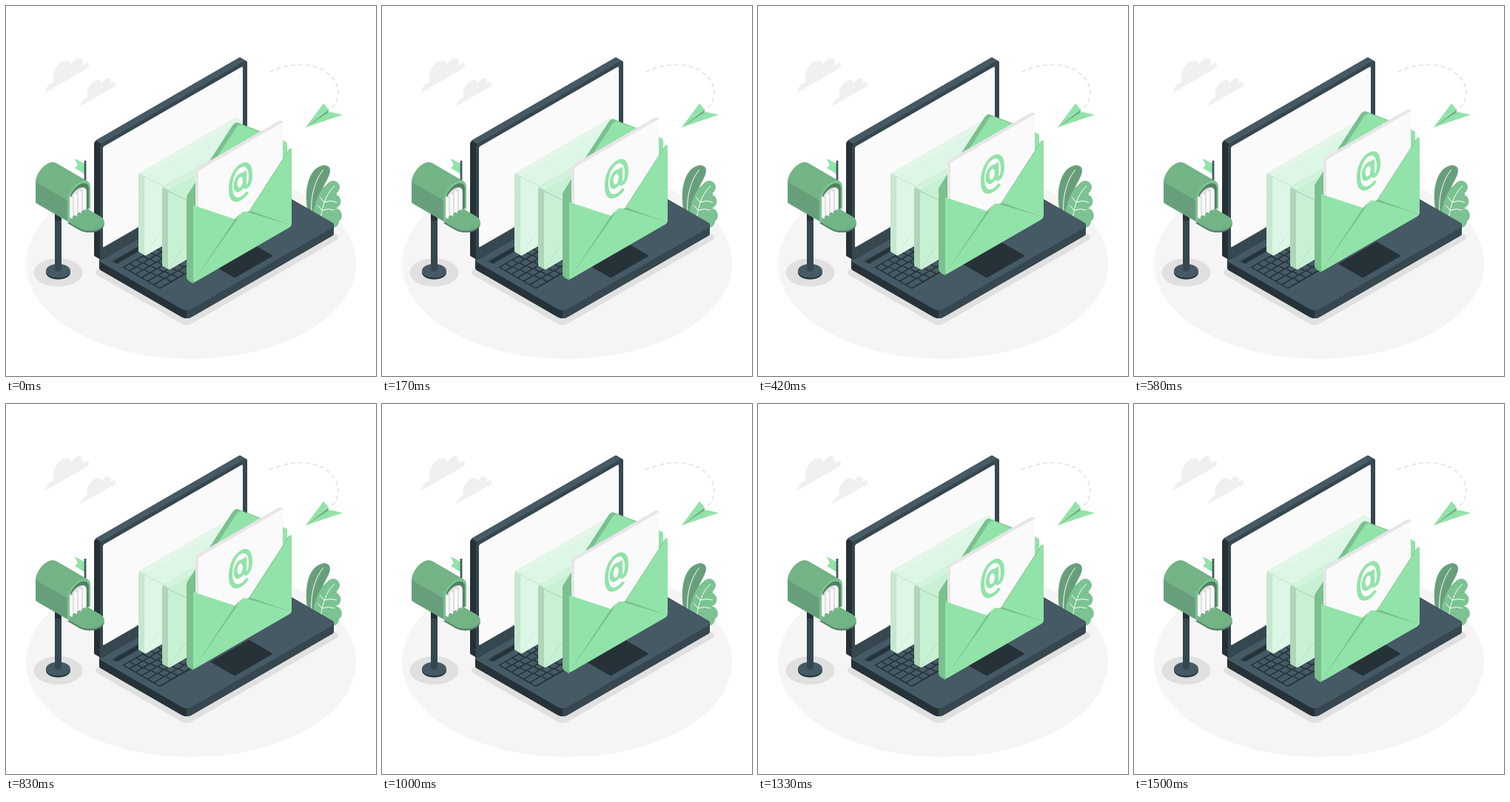
Write an HTML page with a canvas that moves like this. It is 500 px wide and 500 px high and loops after 1.54 s.

```html
<!DOCTYPE html>
<html lang="en">
<head>
<meta charset="utf-8">
<title>Incoming mail</title>
<style>
html, body { margin: 0; width: 100%; height: 100%; overflow: hidden; background: #fff; }
canvas { display: block; width: 100vw; height: 100vh; }
</style>
</head>
<body>
<canvas id="stage"></canvas>
<script>
const LOOP = 1540, PEAK = 712, RISE = 20;
const GREEN = '#92e3a9', FOLD = '#7bc08f', MOSS = '#689f7b', LEAF = '#7cc393';
const INK = '#263238', SLATE = '#37474f', STEEL = '#455a64';
const PAPER = '#fafafa', SHADE = '#e0e0e0';

// Isometric planes; one unit is one pixel across the screen.
const S = 0.577;
const PLANES = { wall: [1, -S, 0, 1], side: [1, S, 0, 1], floor: [1, -S, 1, S] };

const canvas = document.getElementById('stage');
const ctx = canvas.getContext('2d');
const ratio = window.devicePixelRatio || 1;
canvas.width = canvas.height = 500 * ratio;

function onPlane(plane, x, y, paint) {
  ctx.save();
  ctx.transform(...PLANES[plane], x, y);
  paint();
  ctx.restore();
}

function fill(color, trace) {
  ctx.beginPath();
  trace();
  ctx.fillStyle = color;
  ctx.fill();
}

function line(color, width, d) {
  ctx.strokeStyle = color;
  ctx.lineWidth = width;
  ctx.stroke(new Path2D(d));
}

function oval(color, x, y, rx, ry = rx, turn = 0) {
  fill(color, () => ctx.ellipse(x, y, rx, ry, turn, 0, 7));
}

function poly(color, points, radius = 0) {
  const at = i => points[i % points.length];
  const last = at(points.length - 1);
  fill(color, () => {
    ctx.moveTo((last[0] + at(0)[0]) / 2, (last[1] + at(0)[1]) / 2);
    points.forEach((p, i) => ctx.arcTo(...p, ...at(i + 1), radius));
    ctx.closePath();
  });
}

function tile(color, plane, x, y, w, h, radius = 0) {
  onPlane(plane, x, y, () => fill(color, () => ctx.roundRect(0, 0, w, h, radius)));
}

// Repeats a painter along a vector to give it thickness.
function sweep(dx, dy, paint) {
  const steps = Math.ceil(Math.hypot(dx, dy) * 2);
  for (let i = 0; i <= steps; i++) paint(dx * i / steps, dy * i / steps);
}

// Upright slab whose rear top-left corner is at x, y.
function slab(x, y, w, h, depth, radius, face, side, top) {
  sweep(depth, depth * S, (dx, dy) => tile(side, 'wall', x + dx, y + dy, w, h, radius));
  tile(top, 'floor', x + radius / 2, y - radius * S / 2, w - radius, depth);
  tile(face, 'wall', x + depth, y + depth * S, w, h, radius);
}

function drawCloud(x, y, size) {
  onPlane('wall', x, y, () => {
    ctx.scale(size, size);
    fill('#f0f0f0', () => ctx.roundRect(0, -8, 59, 8, [8, 5, 1, 1]));
    fill('#f0f0f0', () => ctx.rect(11, -15, 40, 12));
    oval('#f0f0f0', 23, -16, 12.5);
    oval('#f0f0f0', 42, -12, 9);
  });
}

function drawPlane() {
  const tail = [405, 164], crease = [436, 140], nose = [455, 147];
  ctx.setLineDash([6, 4]);
  line(SHADE, 1.4, 'M356 89C384 76 416 76 434 90C452 104 453 125 440 138');
  ctx.setLineDash([]);
  poly(GREEN, [tail, [429, 131.5], crease]);
  poly('#6fae82', [tail, crease, [435, 151]]);
  poly(GREEN, [tail, [437, 143], nose]);
}

function drawLeaves() {
  fill(MOSS, () => {
    ctx.moveTo(409, 285);
    ctx.bezierCurveTo(401, 250, 408, 218, 430, 215);
    ctx.bezierCurveTo(446, 217, 434, 234, 429, 244);
    ctx.bezierCurveTo(426, 262, 420, 270, 416, 288);
  });
  line('#fff', 1, 'M413 280C411 256 418 234 429 221');
  oval(LEAF, 431, 269, 13, 32, .33);
  for (let i = 0; i < 3; i++) oval(LEAF, 442 + i, 245 + i * 19, 9 + i / 2);
  oval(LEAF, 441, 291, 9);
  line('#fff', 1, 'M425 288C428 268 433 253 444 243');
  for (let i = 0; i < 2; i++) line('#fff', 1, `M${430 - i * 3} ${265 + i * 11}l-6 -7m6 7q9 -3 17 0`);
}

function arch(color, x, y, width, height) {
  const r = width / 2;
  onPlane('wall', x, y, () => fill(color, () => {
    ctx.moveTo(0, height);
    ctx.arc(r, 0, r, Math.PI, 0);
    ctx.lineTo(width, height);
  }));
}

function drawMailbox() {
  oval(SHADE, 70.5, 360, 33, 19);
  oval(INK, 70.5, 360, 16.5, 9.5);
  oval(STEEL, 70.5, 358, 16.5, 9.5);
  fill(SLATE, () => ctx.roundRect(66, 270, 9, 89, 4));
  fill(INK, () => ctx.rect(66, 275, 9, 15));
  poly(GREEN, [[92.5, 206], [106, 213], [106, 227], [93, 219], [97, 215]]);
  line(STEEL, 2.8, 'M107 209V246');
  sweep(43, 25, (dx, dy) => arch('#74b487', 40 + dx, 238 + dy, 31, 28));
  tile(MOSS, 'side', 40, 238, 43, 28, [0, 0, 0, 3]);
  arch('#7cc48f', 83, 263, 31, 28);
  arch('#548264', 86, 262, 26, 26);
  arch(SHADE, 86, 265, 23, 22);
  for (let i = 0; i < 4; i++) tile(PAPER, 'side', 86 + i * 6, 257 - i * 4, 4, 29);
  const door = (color, dy) => tile(color, 'floor', 83, 291 + dy, 30, 30, [0, 14, 14, 0]);
  ctx.save();
  ctx.beginPath();
  ctx.rect(80, 270, 70, 50);
  ctx.clip();
  const panel = (color, dy) => onPlane('floor', 83, 291 + dy, () =>
    fill(color, () => ctx.roundRect(0, 0, 28, 30, [0, 0, 14, 14])));
  panel('#56866a', 2.5);
  panel('#72b486', 0);
  ctx.restore();
}

function drawKeyboard() {
  tile(INK, 'floor', 157, 353, 150, 51);
  onPlane('floor', 157, 353, () => {
    ctx.fillStyle = STEEL;
    for (let row = 0; row < 6; row++) {
      const y = 1.5 + row * 8.2, first = 7 + row * 1.4;
      ctx.fillRect(1.5, y, first, 6.6);
      for (let x = first + 3; x < 140; x += 9) ctx.fillRect(x, y, 7.4, 6.6);
    }
  });
}

function drawLaptop() {
  const deck = (color, dy) => tile(color, 'floor', 122.5, 343 + dy, 202.5, 121.5, 6);
  tile(SHADE, 'floor', 117, 360, 209, 127, 7);
  sweep(0, 11, (dx, dy) => deck(INK, dy));
  ctx.save();
  ctx.beginPath();
  ctx.rect(244, 200, 256, 300);
  ctx.clip();
  sweep(0, 11, (dx, dy) => deck(SLATE, dy));
  ctx.restore();
  deck(STEEL, 0);
  slab(119, 183, 199, 157, 8, 4, SLATE, INK, STEEL);
  tile(PAPER, 'wall', 131, 190.5, 189, 136, 2);
  tile(SLATE, 'floor', 143, 345, 64, 7);
  tile(INK, 'floor', 145, 345, 61, 5);
  drawKeyboard();
  tile(INK, 'floor', 276, 348.5, 52, 33);
}

function drawClosedEnvelope(x, y, face, side, top) {
  const w = 133, h = 107;
  slab(x, y, w, h, 8, 3, face, side, top);
  onPlane('wall', x + 8, y + 8 * S, () => {
    line(side, .8, `M1 1L${w / 2} ${h * .66}L${w} 1M1 ${h - 1}L${w / 2} ${h * .45}`);
  });
}

function drawAtSign() {
  onPlane('wall', 317, 238, () => {
    line(GREEN, 5, 'M9.5 19C5 23 -1 23.5 -5 21C-11 17.5 -13.5 9 -13.5 0C-13.5 -13 -8 -22 0 -22C8 -22 13.5 -14 13.5 -1C13.5 7 11.5 11 8.8 11C6.3 11 5.6 8.5 5.6 4V-11.5');
    ctx.beginPath();
    ctx.ellipse(-.8, 0, 6.2, 9.6, 0, 0, 7);
    ctx.stroke();
  });
}

function drawPaper() {
  sweep(4, 4 * S, (dx, dy) => tile('#e6e6e6', 'wall', 256, 220.5 + dy, 114 + dx, 95, 2));
  tile(PAPER, 'wall', 260, 223, 114, 95, 2);
  drawAtSign();
}

function drawFlap(color, x, y) {
  const w = 131, rise = 63;
  onPlane('wall', x, y, () => poly(color, [[0, 0], [w / 2, -rise], [w, 0], [w, 60], [0, 60]], 5));
}

function drawPocket() {
  const w = 133, h = 107, mid = w / 2, peak = h * .45;
  const cut = 58, dip = cut * .94;
  onPlane('wall', 253, 267.5, () => {
    fill(GREEN, () => {
      ctx.moveTo(0, 2);
      ctx.lineTo(cut, dip);
      ctx.arcTo(mid, peak, w - cut, dip, 6);
      ctx.lineTo(w - cut, dip);
      ctx.lineTo(w - 3, 1);
      ctx.arcTo(w, -2, w, 8, 2);
      ctx.arcTo(w, h, 0, h, 3);
      ctx.arcTo(0, h, 0, 0, 3);
    });
    poly(FOLD, [[1, h - 2], [cut - 2, dip - 1], [cut + 5, dip - 5], [cut, dip + 2]]);
    poly(FOLD, [[w - 1, h - 2], [w - cut - 3, dip - 2], [w - cut + 3, dip]]);
    line(FOLD, 1, `M${w - 3} 1L${w - cut} ${dip}`);
  });
}

function drawOpenEnvelope() {
  drawFlap(FOLD, 244, 257);
  drawFlap(GREEN, 249, 260);
  tile(FOLD, 'wall', 244, 257, 20, 40, 4);
  drawPaper();
  tile(FOLD, 'side', 244, 261, 9.5, 109, [4, 0, 0, 4]);
  drawPocket();
}

// Steady rise and fall, one full swing per loop.
function lift(time) {
  const phase = (time - PEAK + LOOP) % LOOP;
  const away = Math.min(phase, LOOP - phase) / (LOOP / 2);
  return 1.4 - RISE * (1 - away);
}

function draw(time) {
  ctx.setTransform(ratio, 0, 0, ratio, 0, 0);
  ctx.fillStyle = '#fff';
  ctx.fillRect(0, 0, 500, 500);
  oval('#f5f5f5', 250, 348, 223, 129);
  drawCloud(53, 117, 1);
  drawCloud(101, 135, .8);
  drawPlane();
  drawLeaves();
  drawLaptop();
  drawMailbox();
  drawClosedEnvelope(179, 226.5, '#def6e5', '#c6e8d0', '#e3f7e9');
  drawClosedEnvelope(211, 245.5, '#c8f1d4', '#aed6ba', '#d3f4dc');
  ctx.translate(0, lift(time));
  drawOpenEnvelope();
}

const start = performance.now();
function tick() {
  draw((performance.now() - start) % LOOP);
  requestAnimationFrame(tick);
}
tick();
</script>
</body>
</html>
```
